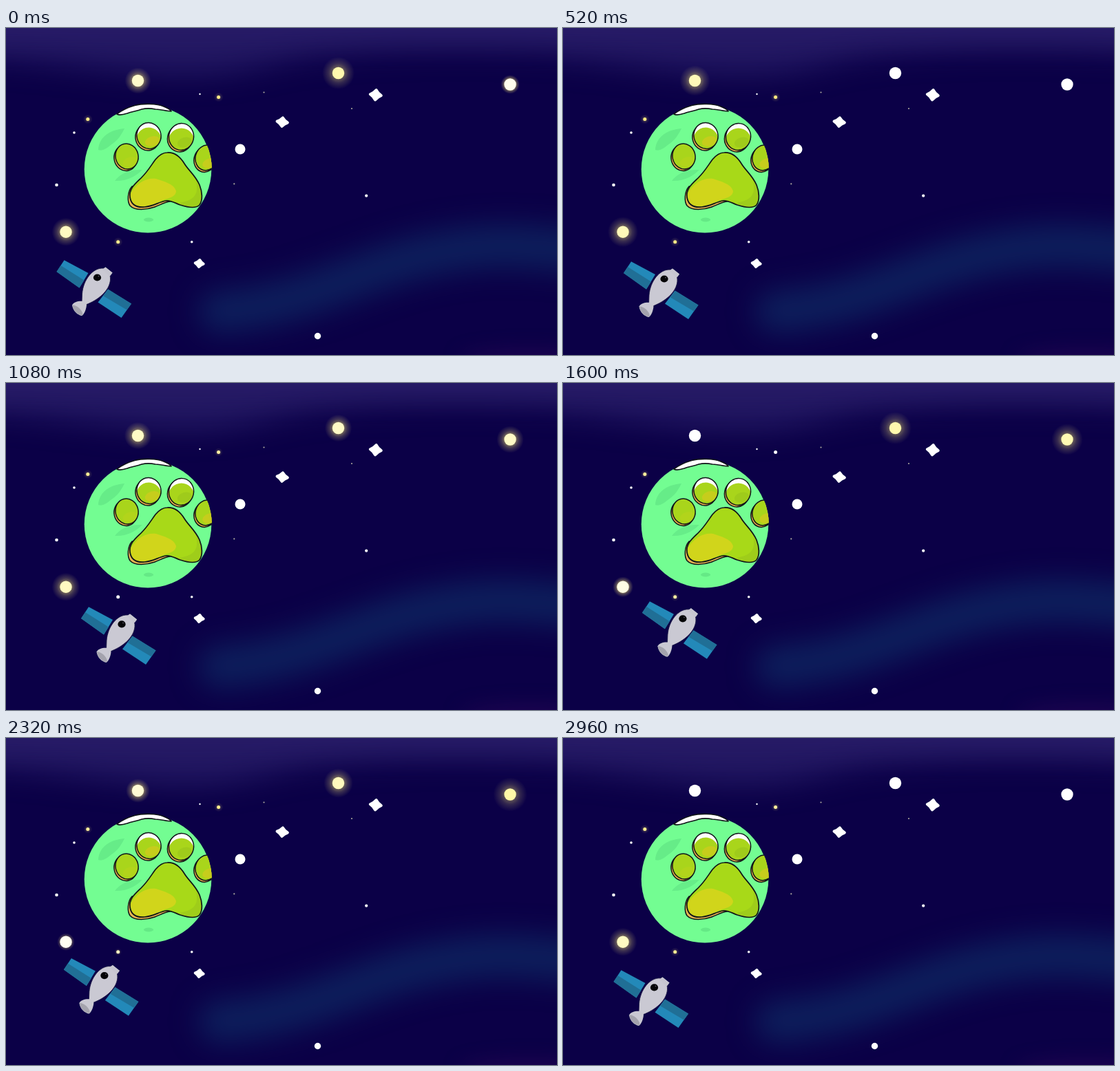
An HTML page with a canvas that plays this animation: 800 by 475 pixels, repeating every 3 s.

```html
<!DOCTYPE html>
<html lang="en">
<head>
<meta charset="utf-8">
<title>Paw planet</title>
<style>
html, body { margin: 0; width: 100%; height: 100%; overflow: hidden; background: #0b0047; }
canvas { display: block; width: 800px; height: 475px; }
</style>
</head>
<body>
<canvas id="stage" width="800" height="475"></canvas>
<script>
const W = 800, H = 475, LOOP = 3000, STEP = 40;
const stage = document.getElementById('stage').getContext('2d');
const scene = document.createElement('canvas');
scene.width = W;
scene.height = H;

function shape(c, d, fill, line, width = 1.5) {
  const p = new Path2D(d);
  if (fill) { c.fillStyle = fill; c.fill(p); }
  if (line) { c.strokeStyle = line; c.lineWidth = width; c.stroke(p); }
}

function oval(c, x, y, rx, ry, turn, fill, line, width = 1.5) {
  c.beginPath();
  c.ellipse(x, y, rx, ry, turn, 0, Math.PI * 2);
  if (fill) { c.fillStyle = fill; c.fill(); }
  if (line) { c.strokeStyle = line; c.lineWidth = width; c.stroke(); }
}

const dot = (c, x, y, r, fill) => oval(c, x, y, r, r, 0, fill);

function sparkle(c, x, y, rx, ry) {
  const k = 0.38;
  c.save();
  c.translate(x, y);
  c.rotate(0.12);
  c.beginPath();
  c.moveTo(-rx, 0);
  c.quadraticCurveTo(-rx * k, -ry * k, 0, -ry);
  c.quadraticCurveTo(rx * k, -ry * k, rx, 0);
  c.quadraticCurveTo(rx * k, ry * k, 0, ry);
  c.quadraticCurveTo(-rx * k, ry * k, -rx, 0);
  c.fillStyle = c.strokeStyle = '#fff';
  c.lineWidth = 4;
  c.fill();
  c.stroke();
  c.restore();
}

function sky(c) {
  c.fillStyle = '#0b0047';
  c.fillRect(0, 0, W, H);
  c.filter = 'blur(20px)';
  shape(c, 'M-80 -80H880V38C700 28 560 30 470 38S350 72 240 68S80 48 -80 42Z', 'rgba(44,32,108,.72)');
  shape(c, 'M-80 -80H880V12H-80Z', 'rgba(48,34,112,.5)');
  shape(c, 'M310 412C440 402 510 350 620 328S760 322 860 324', null, 'rgba(14,42,100,.72)', 62);
  c.filter = 'blur(14px)';
  oval(c, 760, 482, 100, 14, 0, 'rgba(44,8,88,.6)');
  c.filter = 'none';
}

function toe(c, x, y, rx, ry, turn, patch, snow) {
  oval(c, x - 2, y + 2.5, rx, ry, turn, '#e8b04a', '#101418');
  c.save();
  c.beginPath();
  c.ellipse(x, y, rx, ry, turn, 0, Math.PI * 2);
  c.clip();
  oval(c, x, y, rx, ry, turn, snow ? '#fff' : '#a9d51b');
  if (snow) oval(c, x, y + 7, rx + 1, ry, turn, '#a9d51b');
  oval(c, x + 5, y + 8, 11, 7, -0.3, patch);
  c.restore();
  oval(c, x, y, rx, ry, turn, null, '#101418');
}

function planet(c) {
  dot(c, 206, 205.3, 92.3, '#73fd92');
  c.save();
  c.beginPath();
  c.arc(206, 205.3, 92.8, 0, Math.PI * 2);
  c.clip();
  shape(c, 'M134 177C135 160 148 148 172 146C166 158 162 163 152 170C145 176 139 179 134 177Z', '#66ec88');
  shape(c, 'M158 222C166 211 180 205 198 206C190 214 176 223 158 222Z', '#67ed89');
  oval(c, 207, 278.5, 7, 3, 0, '#65e986');
  toe(c, 175.5, 186.5, 16.5, 18.5, -0.25, '#b2d41b');
  toe(c, 207.5, 156.5, 17.5, 19, -0.25, '#c6cd1c', true);
  toe(c, 254.5, 158, 18, 19.5, 0.2, '#9fcb1b', true);
  toe(c, 291, 188.5, 16, 18.5, 0.25, '#c6cd1c');
  c.restore();

  const pad = 'M234 181C246 180 254 189 259 197C265 207 275 214 281 228C285 238 286 250 281 257' +
    'C275 263 262 260 253 257C245 254 239 250 232 251C221 253 214 259 201 260C190 261 182 258 180 246' +
    'C178 233 189 225 197 217C206 208 211 199 217 191C222 185 227 181 234 181Z';
  shape(c, 'M183 230C176 238 176 252 180 258C187 266 205 264 216 260C224 257 230 253 238 252L230 240Z', '#e6b552', '#101418');
  shape(c, pad, '#a8d918');
  c.save();
  c.clip(new Path2D(pad));
  shape(c, 'M180 242C190 224 204 217 218 219C229 223 244 226 247 237C246 247 234 247 225 251C214 257 197 264 184 256Z', '#d1d51b');
  shape(c, 'M276 222C280 242 274 250 252 254L270 268L292 252Z', '#9fcd1a');
  c.restore();
  shape(c, pad, null, '#101418', 1.7);

  shape(c, 'M161 125C169 119 178 115 187 112.5C198 109.5 219 109.5 229 114C234 116 238 118 240 121' +
    'C232 121 226 118 217 118C210 116.5 203 116.5 197 118C189 121 183 121 176 124C170 126 164 127 161 125Z', '#fff', '#101418', 1.6);
}

function paintScene() {
  const c = scene.getContext('2d');
  c.lineJoin = c.lineCap = 'round';
  sky(c);
  planet(c);
  sparkle(c, 401.2, 136.6, 7.7, 6.2);
  sparkle(c, 536.8, 97.2, 8, 7.2);
  sparkle(c, 280.7, 342, 6, 5);
  for (const [x, y, r] of [[340, 176, 7.5], [452.5, 447.5, 4.7], [73.5, 228, 2.3], [99, 152, 1.8],
    [281.5, 96, 1.2], [523.2, 243.7, 2.1], [269.7, 310.7, 1.8]]) dot(c, x, y, r, '#fff');
  for (const [x, y] of [[374.5, 93.5], [502, 117], [331.3, 226.4]]) dot(c, x, y, 1.1, '#aaa59d');
}

// Glow strength of each twinkling star at these moments
const beats = [0, 520, 1080, 1600, 2040, 2600, 2960];
const stars = [
  { x: 191.5, y: 76.5, r: 8.7, glow: [.55, .75, .6, 0, .08, .8, 0] },
  { x: 482.5, y: 65.5, r: 8.7, glow: [.85, 0, .6, .85, .9, .5, 0] },
  { x: 732, y: 82, r: 8.7, glow: [.2, 0, .6, .8, .95, .9, 0] },
  { x: 87, y: 296.2, r: 8.7, glow: [.65, .75, .65, .28, .05, .22, .65] },
  { x: 118.8, y: 132.5, r: 2.5, glow: [.85, .9, .75, .7, .5, .9, .8] },
  { x: 308.6, y: 100.5, r: 2.5, glow: [.85, .9, .65, 0, .85, .75, .7] },
  { x: 162.7, y: 310.8, r: 2.5, glow: [.8, .85, 0, .65, .85, 0, .75] }
];

const mix = (a, b, k) => a + (b - a) * k;
const ease = k => (1 - Math.cos(Math.PI * k)) / 2;

function level(glow, t) {
  let i = 0;
  while (i < beats.length - 2 && t > beats[i + 1]) i++;
  return mix(glow[i], glow[i + 1], ease(Math.min(1, (t - beats[i]) / (beats[i + 1] - beats[i]))));
}

function twinkle(c, { x, y, r, glow }, t) {
  const v = level(glow, t), small = r < 4;
  if (v > 0.01) {
    const reach = r + (small ? 1 + 4 * v : 2 + 15 * v);
    const g = c.createRadialGradient(x, y, r * 0.8, x, y, reach);
    const a = Math.min(1, v * 5) * (small ? 0.25 : mix(0.8, 0.36, v));
    g.addColorStop(0, `rgba(248,234,115,${a})`);
    g.addColorStop(0.45, `rgba(238,222,115,${a * 0.42})`);
    g.addColorStop(1, 'rgba(225,210,115,0)');
    dot(c, x, y, reach, g);
  }
  const blue = mix(255, small ? 115 : 160, v);
  dot(c, x, y, r, `rgb(255,${mix(255, small ? 232 : 247, v)},${blue})`);
}

function bezier(a, b, c, d, s) {
  const q = 1 - s;
  return q * q * q * a + 3 * q * q * s * b + 3 * q * s * s * c + s * s * s * d;
}

// Drifts out along one curve and back along another
function drift(t) {
  const half = LOOP / 2, s = ease((t % half) / half);
  return t < half
    ? [bezier(0, 20.9, 29.6, 42, s), bezier(0, 7.2, -4.5, -20, s)]
    : [bezier(42, 24, -1, 0, s), bezier(-20, -24.4, -19.5, 0, s)];
}

function satellite(c, t) {
  c.save();
  c.translate(...drift(t));
  shape(c, 'M84.5 337.3L119.5 356L106.5 377.5L73.5 354Z', '#2389b9');
  shape(c, 'M79.5 345L113.5 366.5L106.5 377.5L73.5 354Z', '#206f96');
  shape(c, 'M148 379.5L182 400.5L167.5 421L133.5 398.5Z', '#2389b9');
  shape(c, 'M148 379.5L182 400.5L175.5 409.5L141 389Z', '#206f96');
  const edge = '#16103f';
  shape(c, 'M144.5 347.5L154.5 355.5L150 362L139 351Z', '#c7c6d0');
  shape(c, 'M141 349C126 348 112 366 110.5 386L110 399L116 402C134 395 150 382 151.5 366C152 357 148 350 141 349Z', '#cac9d3', edge, 0.8);
  shape(c, 'M144.5 347.5L154.5 355.5L150 361L140 350.5Z', '#c7c6d0');
  shape(c, 'M96 402.5C98 398 106 396 112 397L117 401.5C117 407 114 416 110 418C104 417 97 411 96 402.5Z', '#c9c8d2');
  shape(c, 'M96.5 402.5C102 402 111 409 111.5 416.5C108 419 97 412 96.5 402.5Z', '#a4a3ad');
  oval(c, 132.5, 362.5, 5.6, 5.1, 0, '#050507');
  dot(c, 134.5, 360.5, 0.9, '#55545e');
  c.restore();
}

function draw(now) {
  const t = Math.floor((now % LOOP) / STEP) * STEP;
  stage.drawImage(scene, 0, 0);
  for (const star of stars) twinkle(stage, star, t);
  satellite(stage, t);
}

paintScene();
let start;
function tick(now) {
  start ??= now;
  draw(Math.max(0, now - start));
  requestAnimationFrame(tick);
}
draw(0);
requestAnimationFrame(tick);
</script>
</body>
</html>
```
